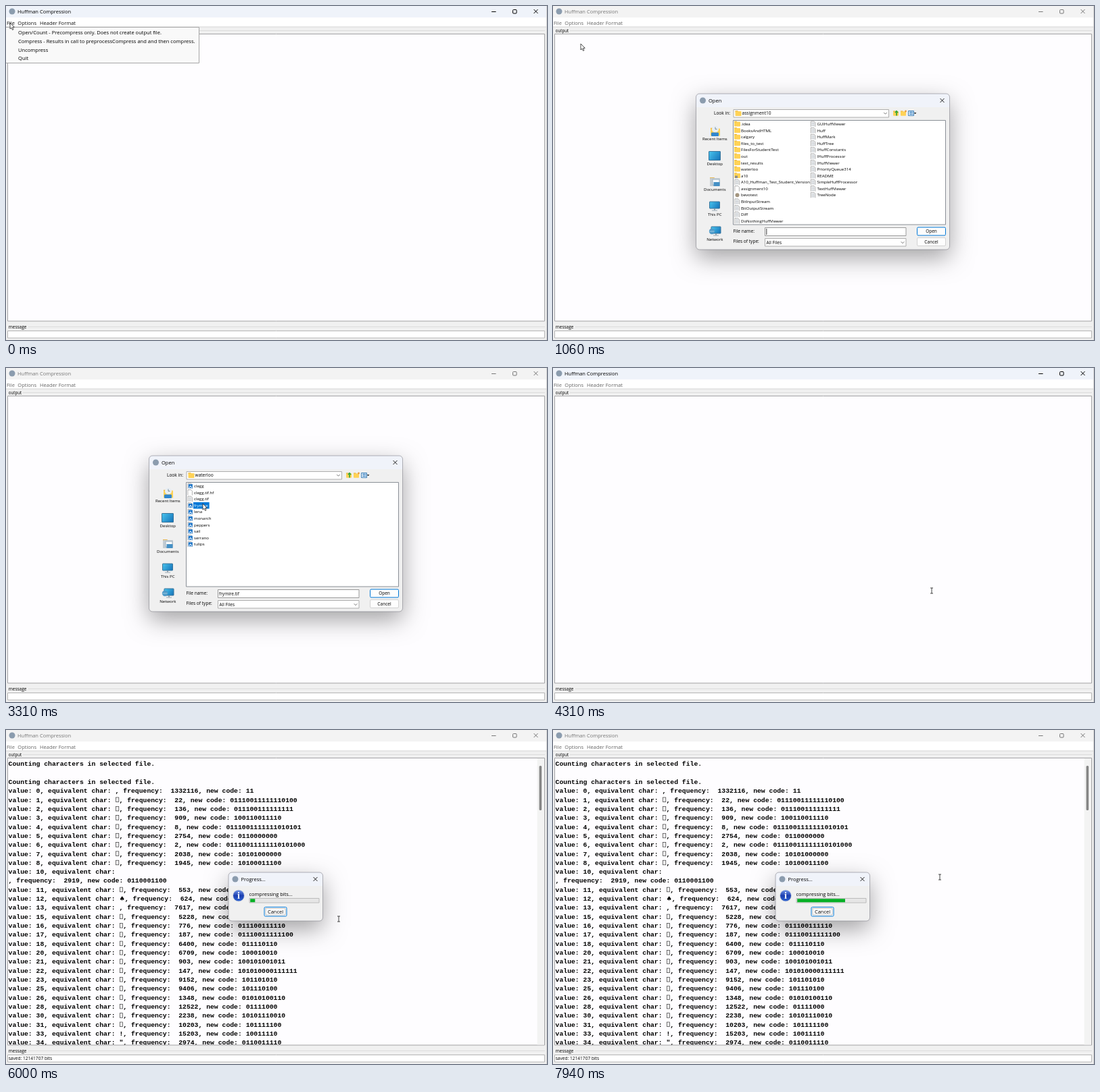
These frames come from a looping animation (800x495 px, 8000 ms). An HTML page with a canvas:

```html
<!DOCTYPE html>
<html lang="en">
<head>
<meta charset="utf-8">
<title>Huffman Compression</title>
<style>
  html, body { margin: 0; width: 100%; height: 100%; overflow: hidden; background: #f0f0f0; }
  canvas { display: block; width: 100vw; height: 100vh; }
</style>
</head>
<body>
<canvas id="stage" width="800" height="495"></canvas>
<script>
const ctx = document.getElementById('stage').getContext('2d');
const LOOP = 8000;
const UI = '"Open Sans", "Noto Sans", sans-serif';
const MONO = 'bold 9.75px "Liberation Mono", monospace';
const BLUE = '#0078d7';

// Moments at which the scene changes, in ms
const AT = {
  menuClosed: 740, chooserOpen: 930, folderPicked: 2200, folderOpen: 2350, filePicked: 3150,
  chooserClosed: 4180, outputShown: 4450, inputOpen: 4650, inputClosed: 5480, progressOpen: 5770
};

// Pointer path: time, x, y
const PATH = [
  [0, 6, 25], [120, 7, 26], [560, 40, 51], [900, 41, 55], [1080, 41, 56], [1750, 270, 222],
  [2050, 291, 238], [2500, 291, 238], [3050, 291, 201], [3380, 291, 201], [3920, 560, 330],
  [4360, 560, 330], [4930, 404, 275], [5060, 404, 275], [5320, 376, 269], [5520, 376, 269],
  [5940, 492, 280], [6080, 492, 280], [6500, 522, 262], [7250, 572, 218], [LOOP, 572, 218]
];

const MENU_ITEMS = [
  'Open/Count - Precompress only. Does not create output file.',
  'Compress - Results in call to preprocessCompress and and then compress.',
  'Uncompress', 'Quit'
];

// Directory entries as "icon:name"
const PROJECT = ('folder:.idea folder:BooksAndHTML folder:calgary folder:files_to_test ' +
  'folder:FilesForStudentTest folder:out folder:text_results folder:waterloo module:a10 ' +
  'page:A10_Huffman_Test_Student_Version blank:assignment10 jar:bevotest page:BitInputStream ' +
  'page:BitOutputStream page:Diff page:DoNothingHuffViewer page:GUIHuffViewer page:Huff ' +
  'page:HuffMark page:HuffTree page:IHuffConstants page:IHuffProcessor page:IHuffViewer ' +
  'page:PriorityQueue314 page:README page:SimpleHuffProcessor page:TextHuffViewer page:TreeNode').split(' ');
const IMAGES = ('image:clegg blank:clegg.tif.hf page:clegg.tif image:frymire image:lena image:monarch ' +
  'image:peppers image:sail image:serrano image:tulips').split(' ');

// value | character | frequency | code
const CODES = `0||1332116|11
1|□|22|01110011111110100
2|□|136|011100111111111
3|□|909|100110011110
4|□|8|0111001111111010101
5|□|2754|0110000000
6|□|2|01110011111110101000
7|□|2038|10101000000
8|□|1945|10100011100
10|\\n|2919|0110001100
11|□|553|0111001110110
12|♠|624|011100111010
13||7617|101001010
15|□|5228|010101000
16|□|776|011100111110
17|□|187|01110011111100
18|□|6400|011110110
20|□|6709|100010010
21|□|903|100101001011
22|□|147|101010000111111
23|□|9152|101101010
25|□|9406|101110100
26|□|1348|01010100110
28|□|12522|01111000
30|□|2238|10101110010
31|□|10203|101111100
33|!|15203|10011110
34|"|2974|0110011110`.split('\n').map(row => row.split('|'));

function box(x, y, w, h, fill, stroke, radius = 0) {
  ctx.beginPath();
  ctx.roundRect(x, y, w, h, radius);
  if (fill) { ctx.fillStyle = fill; ctx.fill(); }
  if (stroke) { ctx.strokeStyle = stroke; ctx.lineWidth = 1; ctx.stroke(); }
}

function disc(x, y, r, fill) {
  ctx.beginPath();
  ctx.arc(x, y, r, 0, 7);
  ctx.fillStyle = fill;
  ctx.fill();
}

function line(color, width, ...points) {
  ctx.beginPath();
  for (let i = 0; i < points.length; i += 2) ctx.lineTo(points[i], points[i + 1]);
  ctx.strokeStyle = color;
  ctx.lineWidth = width;
  ctx.stroke();
}

// Text whose capitals are centred on y
function text(s, x, y, size = 7.5, color = '#000', align = 'left') {
  ctx.font = `${size}px ${UI}`;
  ctx.textAlign = align;
  ctx.fillStyle = color;
  ctx.fillText(s, x, y + size * 0.36);
  ctx.textAlign = 'left';
}

function cross(x, y, color) {
  line(color, 1, x - 3, y - 3, x + 3, y + 3);
  line(color, 1, x - 3, y + 3, x + 3, y - 3);
}

function chevron(x, y) {
  line('#555', 0.8, x - 2.3, y - 1.2, x, y + 1.2, x + 2.3, y - 1.2);
}

function appIcon(x, y) {
  disc(x, y, 4.5, '#8b9cae');
}

function button(label, x, y, w, h, isDefault, size) {
  box(x, y, w, h, '#fdfdfd', isDefault ? BLUE : '#d2d2d2', 1.5);
  text(label, x + w / 2, y + h / 2, size, '#000', 'center');
}

function dialogFrame(x, y, w, h, title, hasIcon) {
  ctx.save();
  ctx.shadowColor = 'rgba(0,0,0,.36)';
  ctx.shadowBlur = 34;
  ctx.shadowOffsetY = 12;
  box(x, y, w, h, '#f0f0f0', null, 5);
  ctx.restore();
  ctx.save();
  ctx.beginPath();
  ctx.roundRect(x, y, w, h, 5);
  ctx.clip();
  box(x, y, w, 20, '#f0f3fa');
  ctx.restore();
  box(x, y, w, h, null, 'rgba(110,110,120,.5)', 5);
  if (hasIcon) appIcon(x + 10, y + 10);
  text(title, x + (hasIcon ? 18.5 : 5), y + 10);
  cross(x + w - 11, y + 10, '#222');
}

function folder(x, y, w = 9, h = 7, color = '#ffd257') {
  box(x, y - h / 2 - 0.8, w * 0.45, 2, '#e5ac32');
  box(x, y - h / 2, w, h, color, null, 0.8);
}

function monitor(x, y, w, h) {
  const glow = ctx.createLinearGradient(x - w / 2, y - h / 2, x + w / 2, y + h / 2);
  glow.addColorStop(0, '#49c5ee');
  glow.addColorStop(1, '#1471b8');
  box(x - w / 2, y - h / 2, w, h, glow, '#38749b', 0.5);
}

function stand(x, y) {
  box(x - 1, y, 2, 2, '#8795a0');
  box(x - 4, y + 2, 8, 1.2, '#a9b5be');
}

function fileIcon(kind, x, y) {
  if (kind === 'folder') return folder(x, y);
  if (kind === 'module') {
    folder(x, y);
    return box(x + 1, y, 4, 3.5, '#8d8d8d');
  }
  if (kind === 'jar') return disc(x + 4.5, y, 3, '#a3957f');
  box(x + 0.8, y - 4, 6.8, 8, '#fff', null);
  line('#8f8f8f', 0.7, x + 0.8, y + 4, x + 0.8, y - 4, x + 5.6, y - 4, x + 7.4, y - 2.2, x + 7.4, y + 4);
  if (kind === 'page') for (let i = -2; i <= 3; i += 1.6) line('#9aa3ab', 0.6, x + 2, y + i, x + 6.3, y + i);
  if (kind === 'image') {
    box(x + 1.8, y - 2.8, 6, 6, '#1c75c9');
    line('#e8f4ff', 1.1, x + 2.6, y + 2.6, x + 4.8, y, x + 7, y + 2.6);
  }
}

function places() {
  folder(233, 187, 14, 11);
  disc(240, 182.5, 5, '#e8eef3');
  line('#58738a', 0.8, 240, 179.5, 240, 182.5, 242.5, 182.5);
  box(234, 187.5, 11, 5.5, '#2f86cf', null, 1);

  monitor(239, 222, 17, 13);

  folder(232, 261, 15, 12, '#c3ccd3');
  box(236, 257, 10, 8, '#f8fbfd', '#9fb2c0');
  box(237.5, 261, 9, 6, '#4590c5');

  monitor(239, 295, 15, 10);
  stand(239, 300.5);

  monitor(241, 332, 14, 10);
  stand(241, 337.5);
  disc(235, 334, 4.2, '#4f9ac8');
  line('#bfe2f3', 0.7, 231.5, 334, 238.5, 334);

  ['Recent Items', 'Desktop', 'Documents', 'This PC', 'Network']
    .forEach((label, i) => text(label, 239.3, 197 + i * 37.3, 6.1, '#000', 'center'));
}

function chooserTools() {
  folder(503, 159.5, 8, 6.5);
  line('#25a336', 1.6, 508, 162.5, 508, 156.5);
  line('#25a336', 1.2, 505.8, 158, 508, 155.5, 510.2, 158);
  folder(514, 159.5, 8, 6.5);
  disc(521.5, 156, 1.4, '#e9993c');
  box(525.5, 155.5, 8, 7, '#fff', '#3a7fb8');
  for (const y of [157.5, 160.2]) line('#2878bd', 1.4, 527, y, 532.5, y);
  ctx.beginPath();
  ctx.moveTo(533.8, 158);
  ctx.lineTo(537.4, 158);
  ctx.lineTo(535.6, 160);
  ctx.fillStyle = '#111';
  ctx.fill();
}

function chooser(t) {
  const inside = t >= AT.folderOpen;
  const entries = inside ? IMAGES : PROJECT;
  const picked = inside ? (t >= AT.filePicked ? 3 : -1) : (t >= AT.folderPicked ? 7 : -1);

  dialogFrame(211.5, 130, 375, 231, 'Open', true);
  text('Look in:', 262, 159, 6.6, '#000', 'right');
  box(267, 153.5, 229.5, 11.5, '#fff', '#adadad');
  folder(269.5, 159.5);
  text(inside ? 'waterloo' : 'assignment10', 279.5, 159, 6.6);
  chevron(491.5, 159);
  chooserTools();
  places();

  box(266.5, 169.5, 314, 154.5, '#fff', '#8a8f96');
  entries.forEach((entry, i) => {
    const [kind, name] = entry.split(':');
    const x = i < 16 ? 268 : 380.5;
    const y = 175 + (i % 16) * 9.57;
    fileIcon(kind, x, y);
    if (i === picked) {
      ctx.font = `6.1px ${UI}`;
      box(x + 9, y - 4.8, ctx.measureText(name).width + 3, 9.6, BLUE);
    }
    text(name, x + 10, y, 6.1, i === picked ? '#fff' : '#000');
  });

  text('File name:', 266.5, 334, 6.6);
  box(313.5, 328.5, 208.5, 12, '#fff', '#999');
  if (picked === 3) text('frymire.tif', 315, 334.5, 6.5);
  else line('#000', 0.8, 315.8, 330, 315.8, 339);
  text('Files of type:', 266.5, 349, 6.6);
  box(313.5, 344.5, 208.5, 11.5, '#fff', '#adadad');
  text('All Files', 315.5, 350.5, 6.5);
  chevron(517, 350.5);
  button('Open', 538.5, 328, 42, 12, true, 6.5);
  button('Cancel', 538.5, 343.5, 42, 12, false, 6.6);
}

function badge(sign, x, y) {
  const shade = ctx.createLinearGradient(x, y - 8, x, y + 8);
  shade.addColorStop(0, '#6d92e6');
  shade.addColorStop(0.5, '#1d3fb0');
  shade.addColorStop(1, '#2d62d0');
  disc(x, y, 8.8, '#c3cbdb');
  disc(x, y, 8, shade);
  ctx.font = 'bold 14px "Liberation Serif", serif';
  ctx.textAlign = 'center';
  ctx.fillStyle = '#fff';
  ctx.fillText(sign, x, y + 4.8);
  ctx.textAlign = 'left';
}

function inputDialog() {
  dialogFrame(321, 209, 156, 76.5, 'Input', false);
  badge('?', 336, 243);
  text('Name of compressed file', 351.5, 240.5, 7.6);
  box(351.5, 247.5, 120, 11.5, '#fff', '#a0a0a0');
  box(352.5, 248.5, 39, 9.5, BLUE);
  text('frymire.tif.hf', 353, 253.2, 6.5, '#fff');
  button('OK', 351.5, 264.5, 45, 14, true, 7.5);
  button('Cancel', 401, 264.5, 45, 14, false, 7.5);
}

function progressDialog(t) {
  const done = Math.max(0, (t - 5785) * 0.000325);
  dialogFrame(329, 211, 139.5, 72, 'Progress...', true);
  badge('i', 344, 245.5);
  text('compressing bits...', 359.5, 243, 7.4);
  box(360, 249.5, 103, 6.5, '#e6e6e6', '#bcbcbc');
  box(361.2, 250.3, 101 * done, 4.9, '#06b025');
  button('Cancel', 382, 262.5, 33, 13.5, true, 7.5);
  ctx.setLineDash([1, 1]);
  box(384, 264.5, 29, 9.5, null, '#8a8a8a');
  ctx.setLineDash([]);
}

function mono(s, x, y) {
  ctx.font = MONO;
  ctx.fillStyle = '#000';
  ctx.fillText(s, x, y);
  return x + ctx.measureText(s).width;
}

function outputText() {
  const left = 3.6;
  let y = 53.3;
  const nextLine = () => { y += 13.32; };
  ctx.save();
  ctx.beginPath();
  ctx.rect(3, 42, 783, 424.5);
  ctx.clip();
  mono('Counting characters in selected file.', left, y);
  nextLine();
  nextLine();
  mono('Counting characters in selected file.', left, y);
  for (const [value, char, count, code] of CODES) {
    nextLine();
    let x = mono(`value: ${value}, equivalent char: `, left, y);
    if (char === '□') {
      ctx.strokeStyle = '#333';
      ctx.lineWidth = 0.7;
      ctx.strokeRect(x + 1, y - 6.6, 4.2, 6.6);
      x += 5.85;
    } else if (char === '♠') {
      ctx.font = '9.4px "DejaVu Sans", sans-serif';
      ctx.fillText(char, x, y);
      x += ctx.measureText(char).width;
    } else if (char === '\\n') {
      nextLine();
      x = left;
    } else {
      x = mono(char, x, y);
    }
    mono(`, frequency:  ${count}, new code: ${code}`, x, y);
  }
  ctx.restore();
  box(785.5, 42, 10.5, 424.5, '#f3f3f3');
  box(788.5, 53, 3.6, 66, '#868686', null, 1.5);
}

function mainWindow(t, active) {
  const ink = active ? '#000' : '#777';
  box(0, 0, 800, 495, '#f0f0f0');
  box(0, 0, 800, 17, active ? '#eff3fa' : '#f3f3f3');
  appIcon(9, 8);
  text('Huffman Compression', 17, 8, 7.5, ink);
  line(ink, 1, 718, 8.5, 724.5, 8.5);
  box(749.5, 5.5, 5.5, 5.5, null, ink, 1);
  cross(783.5, 8, ink);

  const menuInk = t < AT.menuClosed ? '#111' : '#666';
  box(0, 17, 800, 13.5, '#fff');
  line('#d8d8d8', 1, 0, 31, 800, 31);
  text('File', 1, 25, 7.5, menuInk);
  text('Options', 17.3, 25, 7.5, menuInk);
  text('Header Format', 50, 25, 7.5, menuInk);

  line('#dcdcdc', 1, 25, 36.5, 797, 36.5);
  text('output', 3.7, 36.5, 6.2);
  box(2.5, 41.5, 794, 425.5, '#fefdff', '#a2a2a4');
  line('#dcdcdc', 1, 33, 475.5, 797, 475.5);
  text('message', 3.7, 476, 6.5);
  box(2.5, 481.5, 794, 10.5, '#fff', '#b4b4b4');
  line('#d0d0d0', 1, 799.5, 0, 799.5, 495);
  if (t >= AT.outputShown) {
    outputText();
    text('saved: 12141707 bits', 3.7, 487, 6.6);
  }
}

function menu(pointer) {
  box(-0.5, 31.5, 286, 53, '#f9f9f9', '#a6a6a6');
  MENU_ITEMS.forEach((label, i) => {
    const y = 39.3 + i * 12.75;
    if (Math.abs(pointer.y - y) < 6.3) box(1, y - 6.3, 283.5, 12.6, '#91c9f7');
    text(label, 18, y, 7.55);
  });
}

function pointerAt(t) {
  const i = PATH.findIndex(key => key[0] > t);
  const [t0, x0, y0] = PATH[i - 1];
  const [t1, x1, y1] = PATH[i];
  const k = (t - t0) / (t1 - t0);
  const ease = k * k * (3 - 2 * k);
  return { x: x0 + (x1 - x0) * ease, y: y0 + (y1 - y0) * ease };
}

function arrow(x, y) {
  ctx.beginPath();
  [[0, 0], [0, 9], [2, 7.2], [3.5, 10.4], [5, 9.7], [3.6, 6.6], [6.3, 6.4]]
    .forEach(([dx, dy]) => ctx.lineTo(x + dx, y + dy));
  ctx.closePath();
  ctx.fillStyle = '#fff';
  ctx.fill();
  ctx.strokeStyle = '#222';
  ctx.lineWidth = 0.8;
  ctx.stroke();
}

function textCursor(x, y) {
  line('#333', 0.9, x, y - 4, x, y + 4);
  for (const dy of [-4, 4]) line('#333', 0.9, x - 2, y + dy, x + 2, y + dy);
}

function draw(t) {
  const within = (from, to) => t >= from && t < to;
  const choosing = within(AT.chooserOpen, AT.chooserClosed);
  const asking = within(AT.inputOpen, AT.inputClosed);
  const working = t >= AT.progressOpen;
  const pointer = pointerAt(t);

  mainWindow(t, !(choosing || asking || working));
  if (t < AT.menuClosed) menu(pointer);
  if (choosing) chooser(t);
  if (asking) inputDialog();
  if (working) progressDialog(t);

  const overInput = asking && pointer.x < 477 && pointer.y < 285;
  const overProgress = working && pointer.x < 468;
  if (t < AT.chooserClosed || overInput || overProgress) arrow(pointer.x, pointer.y);
  else textCursor(pointer.x, pointer.y);
}

function tick() {
  draw(performance.now() % LOOP);
  requestAnimationFrame(tick);
}
tick();
</script>
</body>
</html>
```
